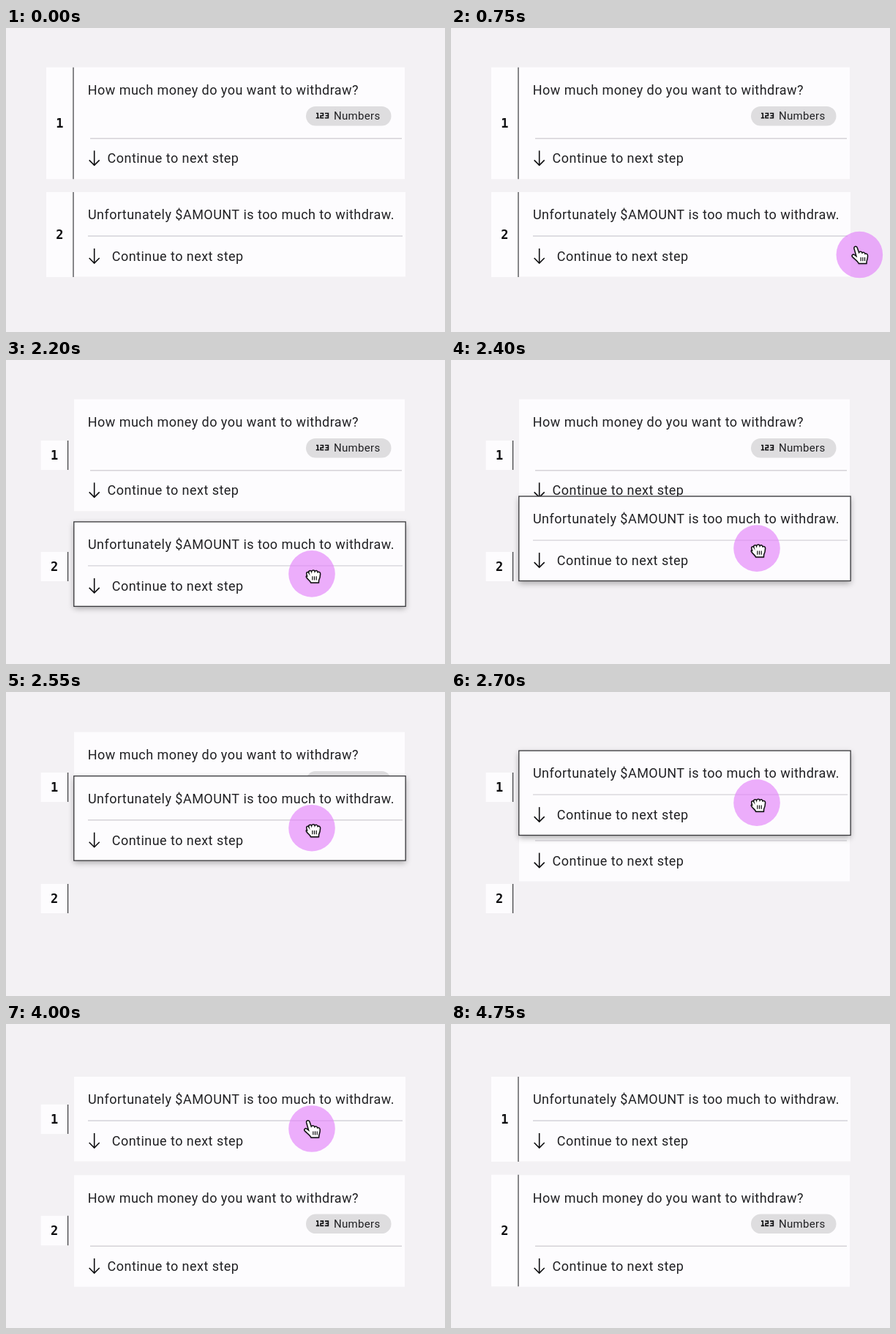
An HTML page with a canvas that plays this animation: 600x415 px, repeating every 6 s.

```html
<!DOCTYPE html>
<html lang="en">
<head>
<meta charset="utf-8">
<title>Reordering steps</title>
<style>
  html, body { margin: 0; width: 100%; height: 100%; overflow: hidden; background: #f3f1f4; }
  canvas { display: block; width: 600px; height: 415px; }
</style>
</head>
<body>
<canvas id="stage"></canvas>
<script>
const W = 600, H = 415, LOOP = 6000;
const canvas = document.getElementById('stage');
const ctx = canvas.getContext('2d');
const dpr = window.devicePixelRatio || 1;
canvas.width = W * dpr;
canvas.height = H * dpr;

const BG = '#f3f1f4', PAPER = '#fdfcfe', INK = '#202023', BLACK = '#0e0e10', RULE = '#d5d3d8';
const SANS = 'Roboto, "Noto Sans", sans-serif';
const MONO = '"DejaVu Sans Mono", monospace';

const POINTER = new Path2D('M-7.4-8.6C-7.8-11.6-4-12.4-3-9.4L-.8-3C.2-4.8 3.2-4.6 3.7-2.4C5-4 7.4-3.2 7.6-1.2' +
  'C9.2-2.2 11-1 11.2 1C11.4 4.4 10.4 6.4 9.8 9L9.6 12L-1 12C-2 9-6 6.6-9.6 3C-11.4.8-9-1.4-6.8.2L-4.4 2Z');
const FIST = new Path2D('M-6.4 3.2L-7.2.2C-8-2.2-5.4-3.2-4.2-1.4C-5-4.4-1.4-5.4-.4-3C0-5.6 3.6-5.6 4.1-3.2' +
  'C5-5.2 7.8-4.6 8-2.2C9.8-3.2 11.8-2 11.6.2C11.4 4 11 6 9.6 8.6L9.4 12L-1.4 12C-2 9.8-4.4 8.4-6.4 6C-8.6 3.4-7.8 2.6-6.4 3.2Z');
const DIGITS = new Path2D('M424 116.5h2.2v6.3M423.8 122.8h4.4M429.4 116.5h4v3.2h-3.4v3.1h4.2M436 116.5h4.4v6.3h-4.6M436.8 119.7h3.6');

const mix = (a, b, k) => a + (b - a) * k;

// Quartic ease in and out between two times
function ease(t, from, to) {
  const u = Math.min(1, Math.max(0, (t - from) / (to - from)));
  return u < 0.5 ? 8 * u ** 4 : 1 - 8 * (1 - u) ** 4;
}

function text(str, x, y, size = 18, spacing = 0.46) {
  ctx.font = `${size}px ${SANS}`;
  ctx.letterSpacing = spacing + 'px';
  ctx.textAlign = 'left';
  ctx.fillStyle = INK;
  ctx.fillText(str, x, y);
}

function line(color, width, ...pts) {
  ctx.strokeStyle = color;
  ctx.lineWidth = width;
  ctx.beginPath();
  for (let i = 0; i < pts.length; i += 2) ctx.lineTo(pts[i], pts[i + 1]);
  ctx.stroke();
}

function nextStep(x, y) {
  line(BLACK, 1.6, 120.7, y - 17, 120.7, y + 3);
  line(BLACK, 1.6, 113.7, y - 4, 120.7, y + 3, 127.7, y - 4);
  text('Continue to next step', x, y);
}

function tile(label, mid, height, split) {
  const x = mix(55, 47.6, split), h = mix(height, 40, split), edge = x + 37;
  ctx.fillStyle = PAPER;
  ctx.fillRect(x, mid - h / 2, 37, h);
  line('#3c3c3f', 1.2, edge, mid - h / 2, edge, mid + h / 2);
  ctx.font = `bold 17px ${MONO}`;
  ctx.letterSpacing = '0px';
  ctx.textAlign = 'center';
  ctx.fillStyle = BLACK;
  ctx.fillText(label, x + 18.4, mid + 6.2);
}

function questionCard(shift) {
  ctx.save();
  ctx.translate(0, shift);
  ctx.fillStyle = PAPER;
  ctx.fillRect(93, 53.7, 452, 152.5);
  text('How much money do you want to withdraw?', 111.7, 91);
  ctx.fillStyle = '#dedddf';
  ctx.beginPath();
  ctx.roundRect(410, 107, 116.5, 26.5, 13.2);
  ctx.fill();
  ctx.strokeStyle = BLACK;
  ctx.lineWidth = 1.6;
  ctx.stroke(DIGITS);
  text('Numbers', 448, 125.2, 15, 0.32);
  line(RULE, 1.4, 115, 150.7, 541, 150.7);
  nextStep(138.6, 184.4);
  ctx.restore();
}

function replyCard(shift, lift) {
  ctx.save();
  ctx.translate(0, shift);
  ctx.fillStyle = PAPER;
  if (lift > 0) {
    ctx.save();
    ctx.shadowColor = `rgba(0,0,0,${0.32 * lift})`;
    ctx.shadowBlur = 8 * dpr;
    ctx.shadowOffsetY = 3 * dpr;
    ctx.fillRect(93, 224, 453, 115.5);
    ctx.restore();
  }
  ctx.fillRect(93, 224, 453, 115.5);
  text('Unfortunately $AMOUNT is too much to withdraw.', 111.9, 261.3);
  line(RULE, 1.4, 112, 284, 542, 284);
  nextStep(144.8, 318);
  if (lift > 0) {
    ctx.globalAlpha = lift;
    ctx.strokeStyle = '#38383b';
    ctx.lineWidth = 1.3;
    ctx.strokeRect(92.8, 224, 453.3, 115.4);
  }
  ctx.restore();
}

function hand(shape, firstCrease, alpha) {
  if (alpha <= 0) return;
  ctx.save();
  ctx.globalAlpha *= alpha;
  ctx.save();
  ctx.shadowColor = 'rgba(0,0,0,.35)';
  ctx.shadowBlur = 2 * dpr;
  ctx.shadowOffsetY = dpr;
  ctx.fillStyle = '#fff';
  ctx.fill(shape);
  ctx.restore();
  ctx.strokeStyle = BLACK;
  ctx.lineWidth = 1.5;
  ctx.stroke(shape);
  for (let i = 0; i < 3; i++) {
    const x = firstCrease + i * 2.7;
    line(BLACK, 1.2, x, 3.4, x, 8.6);
  }
  ctx.restore();
}

function cursor(x, y, grip, alpha) {
  if (alpha <= 0) return;
  ctx.save();
  ctx.translate(x, y);
  ctx.globalAlpha = alpha;
  ctx.fillStyle = 'rgba(227,131,250,.65)';
  ctx.beginPath();
  ctx.arc(0, 0, 31.8, 0, Math.PI * 2);
  ctx.fill();
  hand(POINTER, 1.8, 1 - grip);
  hand(FIST, 0.8, grip);
  ctx.restore();
}

function draw(t) {
  const enter = ease(t, 450, 1100);
  const grab = ease(t, 1000, 1500);
  const drag = ease(t, 1972, 2993);
  const swap = ease(t, 2460, 2990);
  const drop = ease(t, 3500, 3960);
  const join = ease(t, 3900, 4650);

  const split = grab - join;
  const lift = grab - drop;
  const swapped = t > 3000;

  ctx.setTransform(dpr, 0, 0, dpr, 0, 0);
  ctx.fillStyle = BG;
  ctx.fillRect(0, 0, W, H);

  tile('1', 130, swapped ? 116 : 152.5, split);
  tile('2', 282, swapped ? 152.5 : 116, split);
  questionCard(152.6 * swap);
  replyCard(-152 * drag, lift);
  cursor(mix(640, 418, enter), mix(318, 295, enter) - 152 * drag, lift, 1 - join);
}

function loop() {
  draw(performance.now() % LOOP);
  requestAnimationFrame(loop);
}
loop();
</script>
</body>
</html>
```
